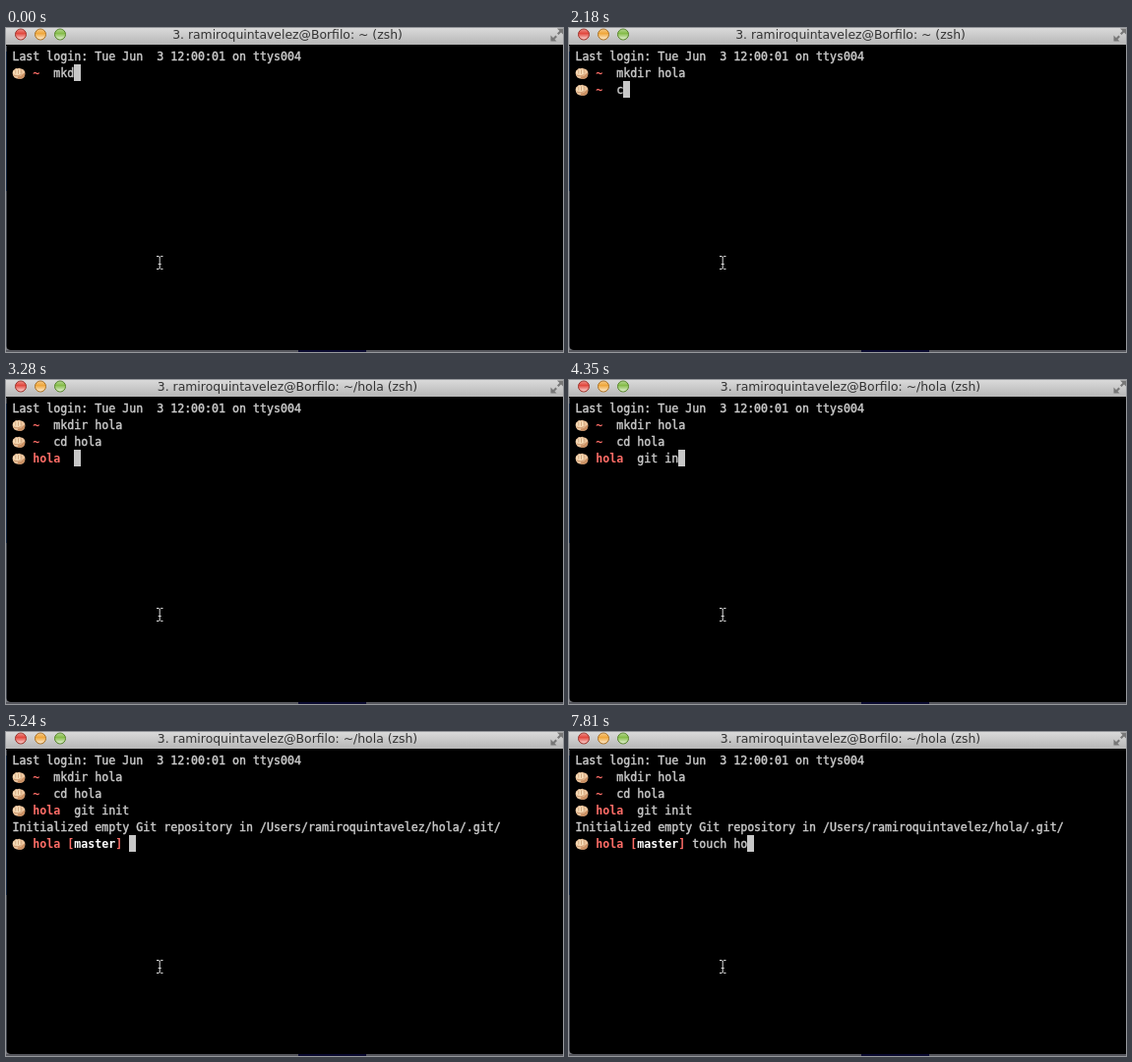
An HTML page that plays this animation: 566x330 px, repeating every 8 s.

```html
<!DOCTYPE html>
<html lang="en">
<head>
<meta charset="utf-8">
<title>Terminal</title>
<style>
  html, body { margin: 0; width: 100%; height: 100%; overflow: hidden; background: #000; }
  #stage { position: relative; width: 566px; height: 330px; overflow: hidden; background: #000; }
  #chrome { position: absolute; inset: 0; }
  #title {
    position: absolute; left: 86px; width: 400px; top: -2px;
    font: 12.4px/18px "DejaVu Sans", sans-serif;
    color: #333; text-align: center; white-space: pre;
  }
  .row {
    position: absolute; left: 6.4px; height: 17px;
    font: 11.627px/17px "DejaVu Sans Mono", monospace;
    color: #cbcbcb; white-space: pre; -webkit-text-stroke: .4px;
  }
  .row svg { position: absolute; left: -.4px; top: .5px; }
  .row b { color: #ff6d67; -webkit-text-stroke: 0; }
  .row b i { color: #fff; font-style: normal; }
  #cursor { position: absolute; width: 7px; height: 17px; background: #c7c7c7; }
</style>
</head>
<body>
<div id="stage">
  <svg id="chrome" width="566" height="330">
    <defs>
      <linearGradient id="bar" x2="0" y2="1">
        <stop offset="0" stop-color="#dadada"/><stop offset="1" stop-color="#b6b6b6"/>
      </linearGradient>
      <linearGradient id="shine" x2="0" y2="1">
        <stop offset="0" stop-color="#fff" stop-opacity=".35"/>
        <stop offset=".4" stop-color="#fff" stop-opacity="0"/>
        <stop offset="1" stop-color="#fff" stop-opacity=".75"/>
      </linearGradient>
      <symbol id="fist" viewBox="0 0 14 14">
        <path d="M.6 7Q.6 4 2.6 3.2Q4 1.6 5.8 2.2Q7.6 1.4 9 2.4Q11.4 2.2 12.2 4Q13.6 5 13.4 7.4L13 9.8Q12 12.600 9 12.800L5 12.600Q2 12 1.200 9.600Z" fill="#ecc49c"/>
        <path d="M1 6.500Q2 3.500 5 3Q8 2.600 9.500 4.500Q10 7.500 7.500 8.500Q3 9.500 1 6.500Z" fill="#f8deba"/>
        <path d="M6 10.600Q9.500 10.600 11 8Q12.500 6.500 13.200 7.500L13 9.800Q12 12.600 9 12.800L6 12.700Z" fill="#c98f62"/>
        <path d="M3.800 4v3.600M6.500 3.400v4.400M9.200 3.800v3.600M2.200 9.300Q6 10.800 9.600 8.600" fill="none" stroke="#b98258" stroke-width=".6"/>
      </symbol>
    </defs>
    <rect width="566" height="17" fill="url(#bar)"/>
    <g stroke-width="1">
      <g fill="#e2493f" stroke="#98372f"><circle cx="15" cy="6.5" r="5.5"/></g>
      <g fill="#f0a83c" stroke="#a5702a"><circle cx="35" cy="6.5" r="5.5"/></g>
      <g fill="#86bd4a" stroke="#57822f"><circle cx="55" cy="6.5" r="5.5"/></g>
    </g>
    <g fill="url(#shine)">
      <circle cx="15" cy="6.5" r="5"/><circle cx="35" cy="6.5" r="5"/><circle cx="55" cy="6.5" r="5"/>
    </g>
    <path d="M560 .5h6v6l-2-2-2.500 2.500-1.500-1.500L562.500 3ZM553.500 7.500v6h6l-2-2 2.500-2.500-1.500-1.500L556 10Z" fill="#777"/>
    <path d="M.5 18V328" stroke="#3c4048"/>
    <path d="M.5 24V166" stroke="#12243f"/>
    <rect y="328" width="566" height="2" fill="#55565c"/>
    <path d="M0 324Q1 328 5 328H0Z" fill="#77787e"/>
    <rect x="297" y="328" width="69" height="2" fill="#0a0a30"/>
    <path d="M153 232.500h2l1.200 1 1.200-1H159.500M153 245.500h2l1.200-1 1.200 1H159.500M156.200 233.500v11M154.700 240.500h3" fill="none" stroke="#dcdcdc"/>
  </svg>
  <div id="title"></div>
  <div id="term"></div>
  <div id="cursor"></div>
</div>
<script>
const LOOP = 8000, CELL = 7, LINE = 17, LEFT = 6, TOP = 20;
const user = 'ramiroquintavelez';
const home = `3. ${user}@Borfilo: ~ (zsh)`;
const hola = `3. ${user}@Borfilo: ~/hola (zsh)`;

// Each command: prompt time, key times, enter time, and the column where typing starts
const commands = [
  { row: 1, dir: '~', col: 6, shown: 0, text: 'mkdir hola',
    keys: [0, 0, 0, 60, 230, 350, 640, 700, 870, 990], enter: 1220 },
  { row: 2, dir: '~', col: 6, shown: 1460, text: 'cd hola',
    keys: [2180, 2330, 2330, 2570, 2630, 2800, 2860], enter: 3040 },
  { row: 3, dir: 'hola', col: 9, shown: 3280, text: 'git init',
    keys: [3760, 3850, 3930, 4020, 4110, 4350, 4400, 4470], enter: 4640 },
  { row: 5, dir: 'hola [<i>master</i>]', col: 17, shown: 5240, text: 'touch ho',
    keys: [7100, 7100, 7280, 7400, 7460, 7580, 7810, 7810], enter: LOOP }
];
const outputAt = 4970;
const titles = [
  [0, home], [1280, '3. mkdir hola (zsh)'], [1400, home],
  [3100, '3. cd hola (zsh)'], [3280, hola],
  [4700, '3. git init (zsh)'], [5030, hola]
];

const $ = id => document.getElementById(id);

function addRow(row, html) {
  const el = document.createElement('div');
  el.className = 'row';
  el.style.top = TOP + 1 + row * LINE + 'px';
  el.innerHTML = html;
  $('term').append(el);
  return el;
}

const show = (el, on) => { el.style.visibility = on ? 'visible' : 'hidden'; };

addRow(0, 'Last login: Tue Jun  3 12:00:01 on ttys004');
const output = addRow(4, `Initialized empty Git repository in /Users/${user}/hola/.git/`);
for (const c of commands) {
  const gap = c.row === 5 ? ' ' : '  ';
  c.el = addRow(c.row, `<svg width="14" height="14"><use href="#fist"/></svg>   <b>${c.dir}</b>${gap}<span></span>`);
  c.typed = c.el.querySelector('span');
}

function draw(t) {
  let row = 0, col = 0;
  for (const c of commands) {
    const on = t >= c.shown;
    show(c.el, on);
    if (!on) continue;
    const n = c.keys.filter(k => k <= t).length;
    c.typed.textContent = c.text.slice(0, n);
    const done = t >= c.enter;
    row = done ? c.row + 1 : c.row;
    col = done ? 0 : c.col + n;
  }
  const printed = t >= outputAt;
  show(output, printed);
  if (printed) row = 5;
  $('cursor').style.left = LEFT + col * CELL + 'px';
  $('cursor').style.top = TOP + row * LINE + 'px';
  $('title').textContent = titles.filter(([at]) => at <= t).pop()[1];
}

const start = performance.now();
function tick(now) {
  draw(Math.max(0, now - start) % LOOP);
  requestAnimationFrame(tick);
}
draw(0);
requestAnimationFrame(tick);
</script>
</body>
</html>
```
